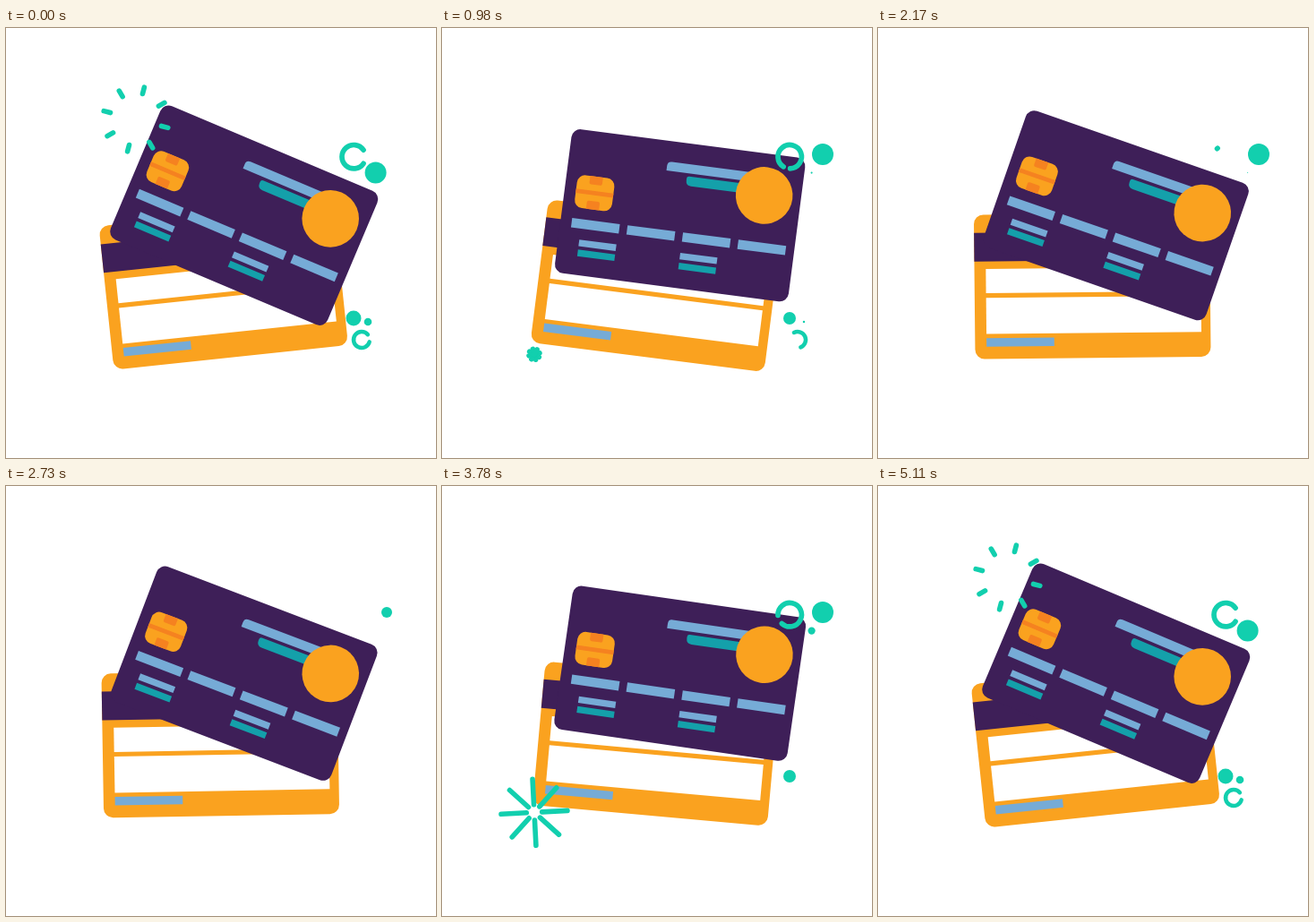
Animation, 480 px wide and 480 px high, one loop 5.25 s. Source, as an HTML page:

```html
<!DOCTYPE html>
<html lang="en">
<head>
<meta charset="utf-8">
<title>Payment cards</title>
<style>
  html, body { margin: 0; width: 100%; height: 100%; overflow: hidden; background: #fff; }
  svg { display: block; width: 100vw; height: 100vh; }
  .plum { fill: #3e1f58; }
  .gold { fill: #faa21f; }
  .amber { fill: #f58220; }
  .sky { fill: #76abd6; }
  .teal { fill: #14a0aa; }
  .white { fill: #fff; }
  .mint { fill: #12cfae; }
  .line { fill: none; stroke: #12cfae; stroke-linecap: round; }
</style>
</head>
<body>
<svg viewBox="0 0 480 480">
  <g id="back"></g>
  <g id="front"></g>
  <g id="decor"></g>
</svg>
<script>
const STEP = 70, LOOP = 5250, TURN = 36;
const HELD = new Set([7, 12, 15, 23, 30, 33]);
const [back, front, decor] = ['back', 'front', 'decor'].map(id => document.getElementById(id));

function set(el, attrs) {
  for (const k in attrs) el.setAttribute(k, attrs[k]);
  return el;
}

const add = (parent, tag, attrs) =>
  set(parent.appendChild(document.createElementNS('http://www.w3.org/2000/svg', tag)), attrs);

const rect = (parent, cls, x, y, width, height, rx = 0) =>
  add(parent, 'rect', { class: cls, x, y, width, height, rx });

// 0 before a, 1 after b, linear between
const ramp = (t, a, b) => Math.min(1, Math.max(0, (t - a) / (b - a)));

// Smooth monotone curve through a few [time, value] points
function curve(...pts) {
  const last = pts.length - 1;
  const slope = i => (pts[i + 1][1] - pts[i][1]) / (pts[i + 1][0] - pts[i][0]);
  const tan = pts.map((p, i) => {
    const a = slope(Math.max(0, i - 1)), b = slope(Math.min(last - 1, i));
    return a * b <= 0 ? 0 : 2 * a * b / (a + b);
  });
  return t => {
    let i = 0;
    while (i < last - 1 && t > pts[i + 1][0]) i++;
    const h = pts[i + 1][0] - pts[i][0];
    const s = (t - pts[i][0]) / h, r = 1 - s;
    return r * r * (1 + 2 * s) * pts[i][1] + s * s * (3 - 2 * s) * pts[i + 1][1]
      + h * s * r * (r * tan[i] - s * tan[i + 1]);
  };
}

// Cards, drawn around their centres
function buildBack(g) {
  rect(g, 'gold', -131.5, -80.5, 263, 161, 10.5);
  rect(g, 'plum', -131.5, -60.3, 263, 32);
  rect(g, 'white', -118.7, -20, 239.9, 27.2);
  rect(g, 'white', -118.7, 12.4, 239.9, 40.3);
  rect(g, 'sky', -118.7, 57.3, 75.6, 9.5);
}

function buildFront(g) {
  rect(g, 'plum', -131.5, -81, 263, 162, 10);
  add(g, 'path', { class: 'sky', d: 'M-21.5-47.8v-5.2q0-5 5-5H90v10.2z' });
  add(g, 'path', { class: 'teal', d: 'M2-41.7q0-2.6 2.6-2.6H90v10.5H8q-6 0-6-6z' });
  add(g, 'circle', { class: 'gold', cx: 90.3, cy: -34.2, r: 31.8 });

  const chip = add(g, 'g', { transform: 'translate(-97.8 -12.4)' });
  rect(chip, 'gold', -21, -18.5, 42, 37, 9);
  rect(chip, 'amber', -21, -2.4, 42, 4.8);
  for (const flip of [1, -1]) {
    add(chip, 'path', { class: 'amber', d: 'M-7.2-18.5H7.2v7.3q0 2-2 2H-5.2q-2 0-2-2z', transform: `scale(1 ${flip})` });
  }

  for (let i = 0; i < 4; i++) rect(g, 'sky', -119 + 62.4 * i, 18.4, 53.7, 10.5);
  for (const x of [-108, 5.7]) {
    rect(g, 'sky', x, 41.3, 41.8, 7.4);
    rect(g, 'teal', x, 52.5, 41.8, 7.4);
  }
}

// Decorations: each returns a function that redraws it.
// A pulse is [radius, grow start, grow end, shrink start, shrink end].
function dot(cx, cy, ...pulses) {
  const el = add(decor, 'circle', { class: 'mint', cx, cy });
  return t => set(el, {
    r: pulses.reduce((sum, [r, a, b, c, d]) => sum + r * ramp(t, a, b) * (1 - ramp(t, c, d)), 0)
  });
}

function ring(cx, cy, r, width, tail, head) {
  const el = add(decor, 'path', { class: 'line', 'stroke-width': width });
  const at = deg => {
    const a = deg * Math.PI / 180;
    return `${cx + r * Math.cos(a)} ${cy + r * Math.sin(a)}`;
  };
  return t => {
    const a = tail(t), b = head(t);
    const arc = `M${at(a)}A${r} ${r} 0 ${b - a > 180 ? 1 : 0} 1 ${at(b)}`;
    set(el, { d: b - a < 1 ? '' : arc });
  };
}

// Rays shoot out, then their inner ends catch up while the whole turns.
function burst(cx, cy, lead) {
  const g = add(decor, 'g', {});
  const rays = Array.from({ length: 8 }, (_, i) =>
    add(g, 'line', { class: 'line', 'stroke-width': 5.6, transform: `rotate(${45 * i})` }));
  return time => {
    const t = time + lead;
    set(g, {
      visibility: t > 910 && t < 2170 ? 'visible' : 'hidden',
      transform: `translate(${cx} ${cy}) rotate(${(t - 1420) / 30})`
    });
    const x1 = 36.5 * ramp(t, 1107, 2040), x2 = 37 * ramp(t, 910, 1330);
    for (const ray of rays) set(ray, { x1, x2 });
  };
}

buildBack(back);
buildFront(front);

const frontTilt = curve([0, 22.9], [560, 14.9], [770, 9.4], [1100, 7], [1540, 10.3], [2170, 19.2], [2590, 22.3]);
const backTilt = curve([0, -6], [560, 0.5], [770, 5.6], [1050, 7.4], [1540, 2.9], [2100, -0.4], [2590, -1.3]);

const parts = [
  ring(388.2, 143.7, 13.2, 5.7,
    t => 35 + 180 * ramp(t, 0, 1540) ** 1.6 + 371 * ramp(t, 1520, 2175),
    t => 325 + 261 * ramp(t, 0, 2080)),
  ring(397, 348, 9, 4.5,
    t => 15 + 570 * ramp(t, 0, 1330) ** 3,
    t => 320 + 265 * ramp(t, 0, 2400)),
  dot(412.6, 161.6, [12, -1, 0, 0, 750], [10, 860, 2000, 1980, 2180]),
  dot(425, 141, [12, 630, 770, 2170, 2590]),
  dot(388, 324, [8.5, -1, 0, 0, 730], [7, 560, 710, 1900, 2170]),
  dot(404, 328, [4.3, -1, 0, 630, 1120]),
  burst(145, 102, 1860),
  burst(103, 364.3, 0)
];

// The motion runs forward, then back, with some steps held twice.
function poseTime(ms) {
  const n = Math.floor((ms % LOOP) / STEP);
  const m = n <= TURN ? n : Math.max(0, 2 * TURN + 1 - n);
  return (HELD.has(m) ? m - 1 : m) * STEP;
}

function draw(ms) {
  const t = poseTime(ms), tilt = backTilt(t);
  const x = 239.2 + 0.1 * Math.min(tilt, 0) ** 2;
  set(back, { transform: `translate(${x} 287.7) rotate(${tilt})` });
  set(front, { transform: `translate(265.7 209.2) rotate(${frontTilt(t)})` });
  for (const update of parts) update(t);
}

const begin = performance.now();
function tick() {
  draw(performance.now() - begin);
  requestAnimationFrame(tick);
}
tick();
</script>
</body>
</html>
```
